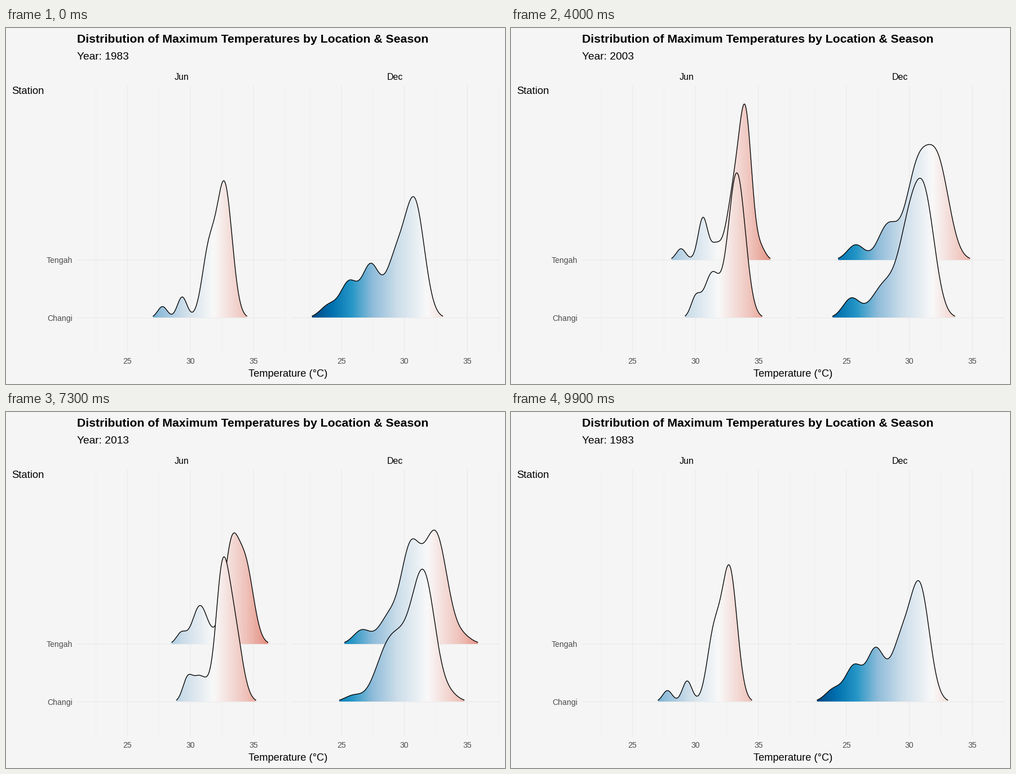
These frames come from a looping animation (885 px wide and 632 px high, 10000 ms). A matplotlib script:

```python
import numpy as np
import matplotlib.pyplot as plt
from matplotlib.animation import FuncAnimation
from matplotlib.colors import LinearSegmentedColormap
from matplotlib.path import Path

W, H, DPI = 885, 632, 100
PX = 72 / DPI                      # one pixel in points
FRAMES, INTERVAL = 100, 100
YEARS = [1983, 1993, 2003, 2013, 2023]
MOVES = [11, 31, 50, 70, 90]       # first frame of each ten-step change
CUT = 3                            # lower parts of a ridge are not drawn

BG, MAJOR, MINOR, GREY = "#f5f5f5", "#ebebeb", "#f0f0f0", "#4d4d4d"
DEGREE = 22.33
PANELS = {"Jun": (126, 497, 215.5), "Dec": (505, 875, 594.8)}  # left, right, x of 25 degrees
BASE = {"Tengah": 411.9, "Changi": 514.5}
SPREAD = {"Jun": 8.5, "Dec": 15}   # usual width of a bump

# Each density is a sum of normal bumps: centre, height and, if unusual, width.
CHANGI_JUN = {
    1983: [(277, 20), (312, 37), (359, 113, 12), (387, 235, 13.5)],
    1993: [(285, 20), (358, 140, 9.3), (378, 262, 14)],
    2003: [(327, 34), (356, 78, 13.5), (400, 257, 15)],
    2013: [(322, 52), (337, 22), (381, 187, 10.4), (405, 188, 14)],
    2023: [(319, 22), (348, 93, 13), (387, 281, 13.2)],
}
TENGAH_JUN = {
    1993: [(292, 21), (388, 306, 13.3), (417, 100, 11)],
    2003: [(301, 20), (340, 75), (362, 24), (396, 120, 13.5), (416, 231, 11), (443, 18)],
    2013: [(312, 20), (339, 25, 12.5), (400, 128, 11), (424, 225, 14.5)],
    2023: [(308, 20), (345, 136, 13), (396, 209, 15.6)],
}
CHANGI_DEC = {
    1983: [(572, 22), (608, 62), (646, 90), (691, 102, 18), (725, 195, 17)],
    1993: [(613, 27), (689, 128, 21), (728, 33, 11), (736, 190, 25)],
    2003: [(603, 34), (662, 58, 22), (704, 128, 18), (733, 200, 18.5)],
    2013: [(615, 18), (691, 175, 25.5), (738, 162, 18.5), (787, 19)],
    2023: [(666, 57, 18.5), (729, 130, 20), (749, 215, 18.5)],
}
TENGAH_DEC = {
    1993: [(607, 21), (640, 17), (715, 128, 26), (752, 167, 24)],
    2003: [(611, 27), (668, 61, 17), (720, 153, 20), (757, 161, 20)],
    2013: [(632, 18), (678, 76, 17), (719, 145, 18.3), (759, 171, 20.5), (811, 19)],
    2023: [(630, 35), (715, 190, 16), (764, 232, 20)],
}

STOPS = [
    (21.0, "#00396b"), (22.6, "#004780"), (24.2, "#0070ae"), (25.8, "#2596c6"),
    (27.5, "#90bcda"), (29.5, "#cddeea"), (31.85, "#f9f9f9"), (34.4, "#efc3bb"),
    (36.3, "#e28b7c"), (37.6, "#d97564"),
]
T_MIN, T_MAX = STOPS[0][0], STOPS[-1][0]
CMAP = LinearSegmentedColormap.from_list(
    "heat", [((t - T_MIN) / (T_MAX - T_MIN), c) for t, c in STOPS], N=512)


def density(x, bumps, spread):
    total = np.zeros_like(x)
    for centre, height, *width in bumps:
        s = width[0] if width else spread
        total += height * np.exp(-0.5 * ((x - centre - 0.5) / s) ** 2)
    return total


plt.rcParams["font.family"] = "Liberation Sans"
fig = plt.figure(figsize=(W / 100, H / 100), dpi=DPI, facecolor=BG)
ax = fig.add_axes([0, 0, 1, 1])
ax.axis("off")


def text(x, y, s, size, **kw):
    return ax.text(x, y, s, fontsize=size * PX, va="baseline", **kw)


def rule(xs, ys, color, width, z):
    ax.plot(xs, ys, color=color, lw=width * PX, zorder=z, solid_capstyle="butt", snap=False)


class Ridge:
    def __init__(self, month, station, years, z):
        left, right, x25 = PANELS[month]
        self.base = BASE[station]
        self.x = np.arange(left, right, 0.5)
        self.h = {y: density(self.x, b, SPREAD[month]) for y, b in years.items()}
        x0, x1 = (x25 + (t - 25) * DEGREE for t in (T_MIN, T_MAX))
        self.fill = ax.imshow(np.linspace(0, 1, 800)[None, :], cmap=CMAP, aspect="auto",
                              extent=(x0, x1, self.base, 100), zorder=z)
        self.line, = ax.plot([], [], color="black", lw=1.35 * PX, zorder=z + 0.1)

    def height(self, a, b, p):
        if a in self.h and b in self.h:
            return (1 - p) * self.h[a] + p * self.h[b]
        # a station missing on one side shows only at rest
        return self.h.get({0: a, 1: b}.get(p))

    def update(self, a, b, p):
        h = self.height(a, b, p)
        for part in (self.fill, self.line):
            part.set_visible(h is not None)
        if h is None:
            return
        shown = h >= CUT
        top = np.where(shown, self.base - h, self.base)
        xs = np.r_[self.x[0], self.x, self.x[-1]]
        ys = np.r_[self.base, top, self.base]
        self.fill.set_clip_path(Path(np.column_stack([xs, ys])), ax.transData)
        self.line.set_data(self.x, np.where(shown, top, np.nan))


for month, (left, right, x25) in PANELS.items():
    for t in np.arange(22.5, 38, 2.5):
        x = x25 + (t - 25) * DEGREE
        major = t % 5 == 0
        rule([x, x], [102, 576], MAJOR if major else MINOR, 1.4 if major else 1, 1)
        if major:
            text(x, 595.5, f"{t:.0f}", 14, color=GREY, ha="center")
    for y in BASE.values():
        rule([left, right], [y, y], MAJOR, 1.4, 1.2)
    text((left + right) / 2 - 0.3, 92.5, month, 16, ha="center")

for name, y in BASE.items():
    text(118.3, y + 5.2, name, 14, color=GREY, ha="right")
text(125.7, 26.5, "Distribution of Maximum Temperatures by Location & Season", 21.33, weight="bold")
text(10.5, 116.7, "Station", 18.5)
text(500.3, 619, "Temperature (°C)", 18.3, ha="center")
year = text(126, 56, "", 19.2)

ridges = [
    Ridge("Jun", "Tengah", TENGAH_JUN, 2), Ridge("Jun", "Changi", CHANGI_JUN, 3),
    Ridge("Dec", "Tengah", TENGAH_DEC, 2), Ridge("Dec", "Changi", CHANGI_DEC, 3),
]
ax.set_xlim(0, W)
ax.set_ylim(H, 0)


def phase(n):
    """Years on both sides of the current change and its progress."""
    a, b, p = YEARS[0], YEARS[1], 0
    for k, first in enumerate(MOVES):
        if n >= first:
            a, b = YEARS[k], YEARS[(k + 1) % len(YEARS)]
            p = min((n - first + 1) / 10, 1)
    return a, b, p


def draw(n):
    a, b, p = phase(n)
    for ridge in ridges:
        ridge.update(a, b, p)
    year.set_text(f"Year: {b if p > 0.5 else a}")
    return []


anim = FuncAnimation(fig, draw, frames=FRAMES, interval=INTERVAL, repeat=True,
                     repeat_delay=0, init_func=lambda: draw(0), blit=False)
plt.show()
```
